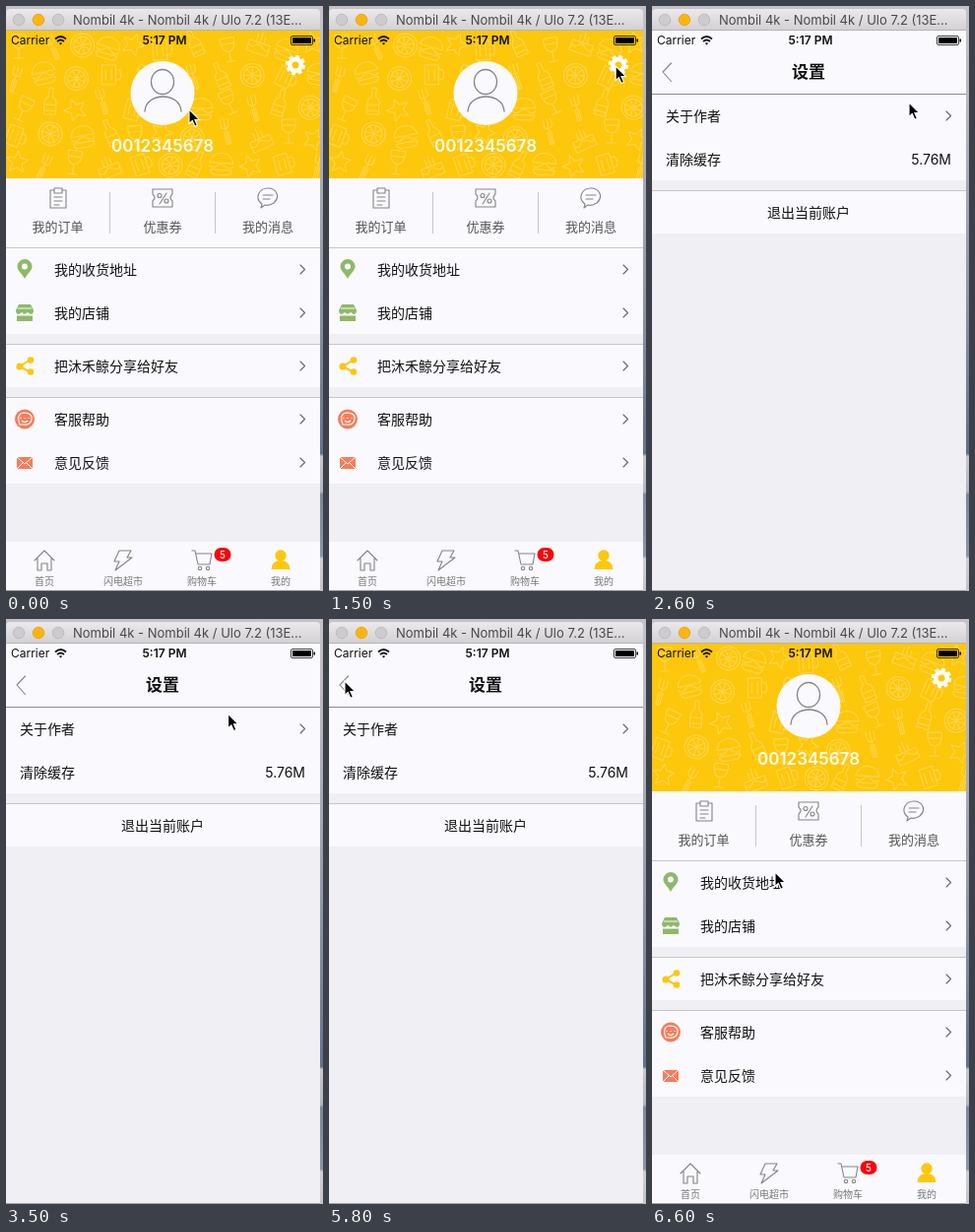
Recreate the animation shown at these times as an HTML page. Size 322 by 594 pixels, loop 6.7 s.

```html
<!DOCTYPE html>
<html lang="zh">
<head>
<meta charset="utf-8">
<style>
html, body { margin: 0; width: 100%; height: 100%; overflow: hidden; }
svg { display: block; width: 322px; height: 594px; }
text { font: 14px Inter, "Noto Sans CJK SC", "Noto Sans CJK", sans-serif; fill: #111; }
.mid { text-anchor: middle; }
.end { text-anchor: end; }
.small { font-size: 13px; fill: #555; }
.tab { font-size: 10px; fill: #777; }
.status { font-size: 12px; }
.bold { font-weight: 600; }
.line { fill: none; stroke: #858585; stroke-width: 1.1; stroke-linecap: round; stroke-linejoin: round; }
.rule { fill: #c5c5ca; }
.card { fill: #f9f9fe; }
.ground { fill: #efeff4; }
.green { fill: #8fb968; }
.orange { fill: #f47d5c; }
.yellow { fill: #fdc70c; }
</style>
</head>
<body>
<svg viewBox="0 0 322 594">
  <defs>
    <linearGradient id="bar" x2="0" y2="1"><stop stop-color="#ebe9eb"/><stop offset="1" stop-color="#d2d0d3"/></linearGradient>
    <linearGradient id="desk" x2="0" y2="1">
      <stop stop-color="#c4c1c9"/><stop offset=".15" stop-color="#b9b8c2"/>
      <stop offset=".5" stop-color="#8f95a8"/><stop offset=".765" stop-color="#62718d"/>
      <stop offset=".77" stop-color="#c6c7ce"/><stop offset=".83" stop-color="#b3b6c1"/>
      <stop offset=".835" stop-color="#7d879d"/><stop offset=".94" stop-color="#8b94a8"/>
      <stop offset=".945" stop-color="#cfcfd3"/><stop offset="1" stop-color="#c3c3c8"/>
    </linearGradient>
    <linearGradient id="shade"><stop stop-opacity="0"/><stop offset="1" stop-opacity=".14"/></linearGradient>
    <clipPath id="screen"><path d="M0 25H319V593H0Z"/></clipPath>
    <clipPath id="header"><path d="M0 25H320V175H0Z"/></clipPath>
    <path id="next" class="line" style="stroke:#666" d="M0-4.5 4.5 0 0 4.5"/>
  </defs>

  <rect width="322" height="594" fill="url(#desk)"/>
  <path d="M0 25V7Q0 3 4 3H315Q319 3 319 7V25Z" fill="url(#bar)"/>
  <path d="M0 24.5H319" stroke="#b5b3b6"/>
  <g fill="#cdcbce" stroke="#b7b5b8" stroke-width=".8">
    <circle cx="13" cy="14" r="5.8"/><circle cx="53" cy="14" r="5.8"/>
    <circle cx="33" cy="14" r="5.8" fill="#fdb50d" stroke="#e2a01a"/>
  </g>
  <text x="68" y="19" style="font-size:13px;fill:#4a484b">Nombil 4k - Nombil 4k / Ulo 7.2 (13E...</text>

  <g clip-path="url(#screen)">
    <g id="profile">
      <path class="ground" d="M0 25H320V594H0Z"/>
      <path class="yellow" d="M0 25H320V175H0Z"/>
      <g clip-path="url(#header)"><g id="doodles" fill="none" stroke="#fed650" stroke-width="1.1" stroke-linejoin="round"/></g>

      <circle cx="159" cy="88.5" r="32.5" class="card"/>
      <g class="line" style="stroke-width:1.3"><ellipse cx="159" cy="77" rx="11.5" ry="12.5"/><path d="M141 107C142 87 177 87 178 107"/></g>
      <text x="159" y="148" class="mid" style="font-size:17px;font-weight:600;fill:#fffdf2">0012345678</text>
      <g fill="none" stroke="#fff" transform="translate(294 60)">
        <circle r="5.8" stroke-width="4.6"/><circle r="8.5" stroke-width="3.4" stroke-dasharray="3.7 2.976"/>
      </g>

      <path class="card" d="M0 175H320V245H0ZM0 246H320V333H0ZM0 344H320V387H0ZM0 398H320V485H0ZM0 544H320V594H0Z"/>
      <path class="rule" d="M0 245H320V246H0ZM0 343H320V344H0ZM0 397H320V398H0ZM105 189H106V231H105ZM212 189H213V231H212Z"/>

      <g class="line">
        <path d="M48 187H45V205H61V187H58M49 185H57V190H49ZM49 194H57M49 198H57M49 202H54"/>
        <path d="M149 186H169V191Q165 194.500 169 198V204H149V198Q153 194.500 149 191Z"/>
        <circle cx="156" cy="192.500" r="2"/><circle cx="163" cy="198" r="2"/><path d="M163 190 156 201"/>
        <path d="M260 201C252 195 257 185 266 185S279 194 272 200C269 202 266 203 263 202L259 205ZM261 192H271M261 196H268"/>
      </g>
      <g class="mid">
        <text x="52.500" y="229" class="small mid">我的订单</text>
        <text x="159" y="229" class="small mid">优惠券</text>
        <text x="266" y="229" class="small mid">我的消息</text>
      </g>

      <path class="green" d="M19 277C16 271 11.500 269 11.500 264.500A7.500 7.500 0 0 1 26.500 264.500C26.500 269 22 271 19 277Z"/>
      <circle cx="19" cy="264.500" r="3" class="card"/>
      <path class="green" d="M13 303H25L28 309Q28 313 25 313L22 311 19 313 16 311 13 313Q10 313 10 309ZM11 314.500H27V320H11Z"/>
      <path d="M12 307H26" stroke="#f9f9fe"/>
      <path d="M25 359 14 366 25 372" fill="none" stroke="#fdc70c" stroke-width="2"/>
      <g class="yellow"><circle cx="14" cy="366" r="3.600"/><circle cx="25" cy="359.500" r="3.300"/><circle cx="25" cy="371.500" r="3.300"/></g>
      <circle cx="19" cy="419.500" r="10" class="orange"/>
      <path d="M14 425Q10 414 18 413Q27 413 26 420Q24 426 18 425ZM15 418V419M19 418V419M23 418V419M16 421Q19 424 22 421" fill="none" stroke="#fff" stroke-width="1.100"/>
      <path class="orange" d="M11 458H27V470H11Z"/>
      <path d="M11 458 19 465 27 458M11 470 17 464M27 470 21 464" fill="none" stroke="#fff"/>

      <g id="rows"></g>

      <g class="line">
        <path d="M29 563 39 553 49 563M32 561V573H36V566H42V573H46V561"/>
        <path d="M115 553H127L123 560H128L111 573 115 564H110Z"/>
        <path d="M189 553H192L195 567H207L209 556H193"/>
        <circle cx="197" cy="571" r="1.700"/><circle cx="205" cy="571" r="1.700"/>
      </g>
      <g class="yellow"><circle cx="279" cy="558" r="5.700"/><path d="M269.500 572Q270 563 279 563T288.500 572Z"/></g>
      <rect x="211.500" y="550" width="17" height="14" rx="7" fill="#f5080c"/>
      <text x="220" y="560.700" class="mid" style="font-size:10px;fill:#fff">5</text>
      <text x="39" y="588" class="tab mid">首页</text>
      <text x="119" y="588" class="tab mid">闪电超市</text>
      <text x="199" y="588" class="tab mid">购物车</text>
      <text x="279" y="588" class="tab mid">我的</text>
    </g>
    <rect id="dim" y="25" width="320" height="569"/>

    <g id="settings">
      <rect x="-8" y="25" width="8" height="569" fill="url(#shade)"/>
      <path class="ground" d="M0 25H320V594H0Z"/>
      <path class="card" d="M0 25H320V177H0ZM0 188H320V231H0Z"/>
      <path d="M0 89H320V90H0Z" fill="#8c8c91"/>
      <path class="rule" d="M0 187H320V188H0Z"/>
      <path class="line" d="M19.500 58 11 67 19.500 76.500"/>
      <text x="159" y="73" class="mid bold" style="font-size:17px">设置</text>
      <text x="14" y="117">关于作者</text>
      <text x="14" y="161">清除缓存</text>
      <text x="304" y="161" class="end">5.76M</text>
      <text x="159" y="215" class="mid">退出当前账户</text>
      <use href="#next" x="299" y="111.500"/>
    </g>
  </g>

  <text x="5" y="39" class="status">Carrier</text>
  <g fill="none" stroke="#111" stroke-width="1.700"><path d="M50 33.500Q55.500 28.500 61 33.500M52 36Q55.500 33 59 36"/><path d="M55.500 39.500 53.800 37.800Q55.500 36.500 57.200 37.800Z" fill="#111" stroke="none"/></g>
  <text x="161" y="39" class="status bold mid">5:17 PM</text>
  <rect x="289.500" y="30.500" width="22" height="9" rx="1.500" fill="none" stroke="#111" stroke-width=".8"/>
  <path d="M291 32H310V38H291ZM312.500 33.500H314V36.500H312.500Z"/>
  <path d="M0 593.500H319" stroke="#a3a3a8"/>

  <path id="cursor" d="M0 0V14.500L3.300 11.500 5.800 17.300 8.400 16.200 5.900 10.500H10.500Z" stroke="#fff" stroke-width="1.100"/>
</svg>
<script>
const $ = id => document.getElementById(id);

const rows = [[268, '我的收货地址'], [312, '我的店铺'], [366, '把沐禾鲸分享给好友'], [420, '客服帮助'], [464, '意见反馈']];
$('rows').innerHTML = rows.map(([y, label]) =>
  `<text x="49" y="${y + 5}">${label}</text><use href="#next" x="299" y="${y - .5}"/>`).join('');

// Outlined food and drink, each drawn around its own centre.
const shapes = {
  g: 'M-7-12H7Q8 1 0 2Q-8 1-7-12M0 2V12M-5 12H5M-6-6H6',
  b: 'M-2-14H2V-5Q6-3 6 2V13H-6V2Q-6-3-2-5ZM-6 3H6M-6 9H6',
  o: 'M-12 0A12 12 0 1 1 12 0A12 12 0 1 1-12 0M-9 0A9 9 0 1 1 9 0A9 9 0 1 1-9 0M-9 0H9M0-9V9M-6-6 6 6M6-6-6 6',
  f: 'M-4-13V-5Q0-1 4-5V-13M0-13V13M-2 0V13H2V0',
  c: 'M-11 11V0H11V11ZM-11 4Q-7 8-4 4T4 4T11 4M-4 0V-8M4 0V-8M0 0V-11',
  s: 'M0-11 3-4 11-3 5 2 7 10 0 6-7 10-5 2-11-3-3-4Z',
  m: 'M-9-9H5V11H-9ZM5-4H9Q12 2 9 6H5M-5-5V7M1-5V7',
  h: 'M-12-1Q-10-11 0-11T12-1ZM-12 2Q-8 6-4 2T4 2T12 2M-11 6H11Q10 11 6 11H-6Q-10 11-11 6'
};
const layout = ['gfohsmbgchs', 'fhomgsfbomh', 'gbsfmchgfbo', 'mohbgsofcgs', 'sfgcmobhsmf'];
$('doodles').innerHTML = layout.map((line, r) => [...line].map((key, c) => {
  const x = 13 + c * 30 + 5 * Math.sin(r * 4 + c), y = 41 + r * 30 + 4 * Math.sin(c * 3 + r);
  const turn = 25 * Math.sin(c * 5 + r * 7);
  return `<path d="${shapes[key]}" transform="translate(${x} ${y}) rotate(${turn})"/>`;
}).join('')).join('');

const LOOP = 6700, PUSH = 1700, POP = 5900;
const path = [
  [0, 186, 105], [500, 192, 105], [900, 226, 91], [1400, 291, 61], [1800, 292, 62], [2100, 289, 66],
  [2600, 261, 98], [3300, 257, 101], [4200, 8, 64], [4400, 3, 65], [5000, 11, 62],
  [5800, 16, 63], [6000, 17, 64], [6600, 125, 257], [6700, 130, 259]
];

// Critically damped spring: the share of the way still to go.
function rest(ms) {
  const k = Math.max(0, ms) * .01805;
  return Math.exp(-k) * (1 + k);
}

function cursorAt(t) {
  const i = path.findIndex(p => p[0] > t);
  const [t0, x0, y0] = path[i - 1], [t1, x1, y1] = path[i];
  const u = (t - t0) / (t1 - t0), e = u * u * (3 - 2 * u);
  return [x0 + (x1 - x0) * e, y0 + (y1 - y0) * e];
}

const move = (id, x, y = 0) => $(id).setAttribute('transform', `translate(${x} ${y})`);

const start = performance.now();
function draw() {
  const t = Math.floor(Math.max(0, performance.now() - start) % LOOP / 100) * 100;
  const open = t < POP ? 1 - rest(t - PUSH) : rest(t - POP);
  move('settings', Math.round(320 * (1 - open)));
  $('settings').style.display = open > .001 ? '' : 'none';
  move('profile', Math.round(-96 * open));
  $('dim').style.opacity = .1 * open;
  move('cursor', ...cursorAt(t));
  requestAnimationFrame(draw);
}
draw();
</script>
</body>
</html>
```
